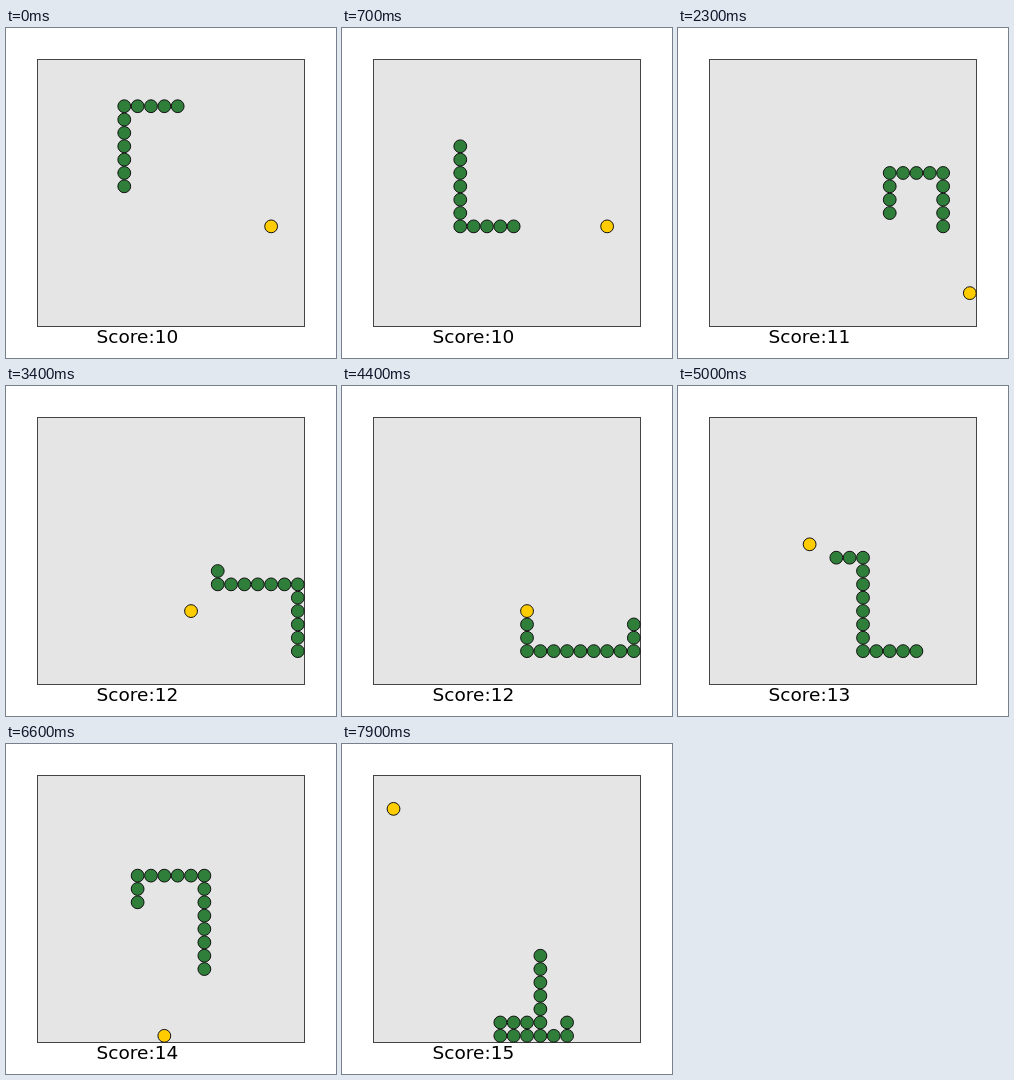
Write an HTML page with a canvas that moves like this. It is 330x330 px and loops after 8000 ms.

```html
<!DOCTYPE html>
<html lang="en">
<head>
<meta charset="utf-8">
<title>Snake</title>
<style>
  html, body { margin: 0; width: 330px; height: 330px; overflow: hidden; background: #fff; }
  canvas { display: block; }
</style>
</head>
<body>
<canvas id="stage" width="330" height="330"></canvas>
<script>
const ctx = document.getElementById('stage').getContext('2d');
const LOOP = 8000, TICK = 100;
const EDGE = 31.5, SIZE = 267, CELL = SIZE / 20;
const START_SCORE = 10;

// Steering: direction and number of cells; * means food lies at the end of the run
const STEERING = 'L4 D9 R11* U4 L4 D4 R6 D5* L8 U3* U4 L4 U1* U2 R5 D11 L3 D1* R5 U1 U16 L13*';
const DIRECTIONS = { L: [-1, 0], R: [1, 0], U: [0, -1], D: [0, 1] };

const route = [[10, 3]];
const foodSteps = [];
for (const run of STEERING.split(' ')) {
  const [dx, dy] = DIRECTIONS[run[0]];
  for (let n = parseInt(run.slice(1)); n > 0; n--) {
    const [x, y] = route.at(-1);
    route.push([x + dx, y + dy]);
  }
  if (run.endsWith('*')) foodSteps.push(route.length - 1);
}

function dot([col, row], color) {
  ctx.beginPath();
  ctx.arc(EDGE + (col + 0.5) * CELL, EDGE + (row + 0.5) * CELL, 6.4, 0, 2 * Math.PI);
  ctx.fillStyle = color;
  ctx.fill();
  ctx.strokeStyle = '#111';
  ctx.stroke();
}

function draw(time) {
  const tick = Math.floor(time % LOOP / TICK);
  // The game moves slightly faster than the picture refreshes
  const head = START_SCORE + Math.floor(tick * 1.08 + 0.3);
  const eaten = foodSteps.filter(step => step <= head).length;
  const score = START_SCORE + eaten;

  ctx.lineWidth = 1;
  ctx.fillStyle = '#fff';
  ctx.fillRect(0, 0, 330, 330);
  ctx.fillStyle = '#e5e5e5';
  ctx.fillRect(EDGE, EDGE, SIZE, SIZE);
  ctx.strokeStyle = '#444';
  ctx.strokeRect(EDGE, EDGE, SIZE, SIZE);

  dot(route[foodSteps[eaten]], '#fc0');
  for (const cell of route.slice(head - score, head + 1)) dot(cell, '#2f7f3b');

  ctx.fillStyle = '#000';
  ctx.font = '18.5px Verdana, "DejaVu Sans", sans-serif';
  ctx.fillText('Score:' + score, 90.6, 315);
}

let start;
function loop(now) {
  start ??= now;
  draw(now - start);
  requestAnimationFrame(loop);
}
draw(0);
requestAnimationFrame(loop);
</script>
</body>
</html>
```
